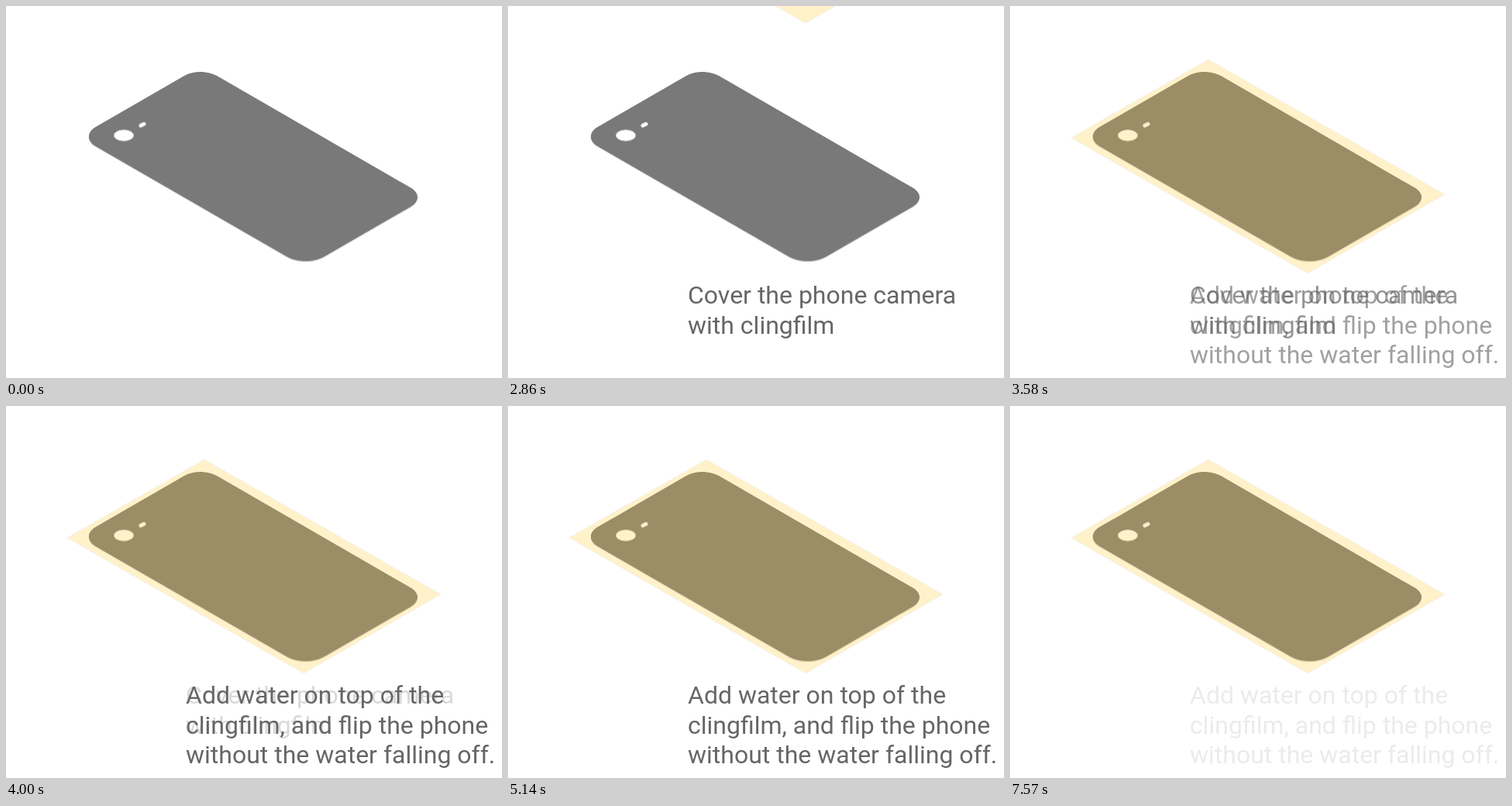
An HTML page for the animation above (7.63 s loop, 640 px wide and 480 px high).

```html
<!DOCTYPE html>
<html lang="en">
<head>
<meta charset="utf-8">
<title>Phone camera water lens</title>
<style>
  html, body { margin: 0; width: 100%; height: 100%; overflow: hidden; background: #fff; }
  svg { display: block; width: 100vw; height: 100vh; }
  text { font: 32px Roboto, Arial, sans-serif; fill: #666; }
</style>
</head>
<body>
<svg viewBox="0 0 640 480">
  <path id="edge" fill="#c9c9c9" transform="translate(0 1.2)"/>
  <path id="phone" fill="#797979"/>
  <g fill="#fff" stroke="#c4c4c4">
    <ellipse cx="152" cy="167" rx="12.7" ry="7.2"/>
    <path d="M174 154.3L178 152.3" stroke-width="5.6" stroke-linecap="round"/>
    <path d="M174 154.3L178 152.3" stroke="#fff" stroke-width="4" stroke-linecap="round"/>
  </g>
  <path id="film" d="M79 170L256 69L561 243L384 345Z" fill="rgb(255,203,51)" fill-opacity=".25" stroke="#ededed" stroke-width=".6"/>
  <path id="drop" fill="#4472c4" d="M150 75C153 84 167 97 167 109A17 16.5 0 0 1 133 109C133 97 147 84 150 75Z"/>
  <text id="cover">
    <tspan x="232" y="384">Cover the phone camera</tspan>
    <tspan x="232" y="423">with clingfilm</tspan>
  </text>
  <text id="water">
    <tspan x="232" y="384">Add water on top of the</tspan>
    <tspan x="232" y="423">clingfilm, and flip the phone</tspan>
    <tspan x="232" y="461">without the water falling off.</tspan>
  </text>
</svg>
<script>
const LOOP = 7630, STEP = 60, HALF = 465;
const $ = id => document.getElementById(id);
const clamp = v => Math.min(1, Math.max(0, v));
const progress = (t, start, length) => clamp((t - start) / length);

// Slanted rectangle; each corner is [x, y, horizontal reach of its rounding].
function roundedPath(corners) {
  const n = corners.length;
  const toward = ([x, y], [a, b], reach) => {
    const k = reach / Math.abs(a - x);
    return [x + (a - x) * k, y + (b - y) * k];
  };
  return corners.map((c, i) => {
    const prev = corners[(i + n - 1) % n], next = corners[(i + 1) % n], r = c[2];
    const start = toward(c, prev, r), end = toward(c, next, r);
    const c1 = toward(c, prev, r * 0.448), c2 = toward(c, next, r * 0.448);
    return `${i ? "L" : "M"}${start}C${c1} ${c2} ${end}`;
  }).join("") + "Z";
}

const outline = roundedPath([
  [94.3, 168.5, 21.5], [251.1, 78, 21], [543.3, 246.6, 21], [386.5, 337.1, 24]
]);
$("phone").setAttribute("d", outline);
$("edge").setAttribute("d", outline);

// Motion advances in fixed steps inside three active spans, with holds between.
function stepped(t) {
  const [start, end] = t < 2860 ? [0, 1860] : t < 7210 ? [2860, 5140] : [7210, 7570];
  return Math.min(end, start + Math.floor((t - start) / STEP) * STEP);
}

function show(id, opacity, dy = 0) {
  $(id).setAttribute("opacity", opacity);
  $(id).setAttribute("transform", `translate(0 ${dy})`);
}

function draw(time) {
  const t = stepped(time % LOOP);
  show("cover", progress(t, 0, 1860) * (1 - progress(t, 3295, 2 * HALF)));
  show("film", t >= 2860 ? 1 : 0, -345 * (1 - progress(t, 2830, HALF)));
  show("water", progress(t, 3295, HALF) * (1 - progress(t, 7150, 480)));
  const fall = progress(t, 4212, HALF);
  show("drop", fall > 0 ? 1 - progress(t, 4677, 463) : 0, 177 * fall - 125.5);
}

const origin = performance.now();
function tick() {
  draw(performance.now() - origin);
  requestAnimationFrame(tick);
}
tick();
</script>
</body>
</html>
```
